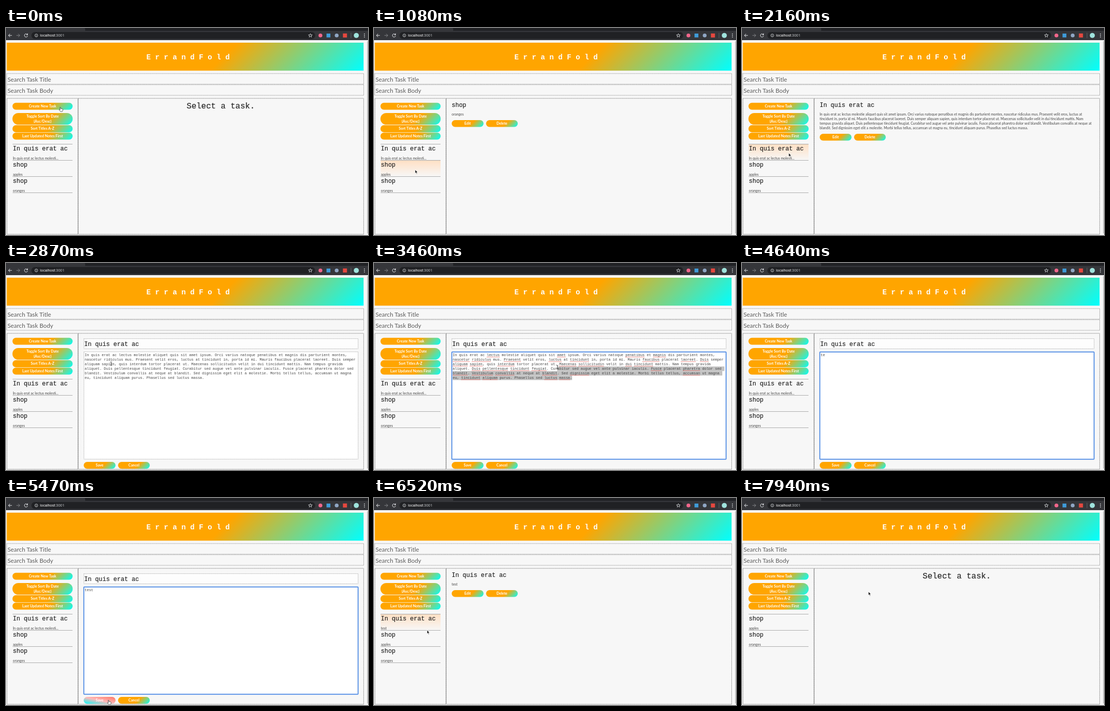
Animation of 713 by 409 pixels, one loop 8 s. Source, as an HTML page:

```html
<!DOCTYPE html>
<html lang="en">
<head>
<meta charset="utf-8">
<title>Task list</title>
<style>
html, body { margin: 0; width: 100%; height: 100%; overflow: hidden; background: #f7f7f7; }
svg { display: block; width: 713px; height: 409px; }
text, p { font-family: Lato, sans-serif; font-size: 6.85px; fill: #444; color: #444; }
p { margin: 0; line-height: 9px; }
.mono { font-family: "Liberation Mono", monospace; white-space: pre; }
.title { font-size: 12px; fill: #1c1c1c; stroke: #1c1c1c; stroke-width: .15px; }
.code { font-size: 7px; fill: #444; }
.big { font-size: 16px; fill: #2a2a2a; stroke: #2a2a2a; stroke-width: .2px; text-anchor: middle; }
.brand { font-size: 14.4px; font-weight: 700; fill: #fff; text-anchor: middle; }
.btn { font-size: 7.25px; font-weight: 700; fill: #fff; text-anchor: middle; }
.search { font-size: 11.8px; fill: #5c5c5c; }
.url { font-family: Roboto, sans-serif; font-size: 7.3px; fill: #fff; }
</style>
</head>
<body>
<svg viewBox="0 0 713 409" xmlns="http://www.w3.org/2000/svg">
  <defs>
    <linearGradient id="hot" x1="0" y1="1" x2="1" y2="0">
      <stop offset="0" stop-color="cyan"/><stop offset=".5" stop-color="#ffb8b8"/><stop offset="1" stop-color="#ff7561"/>
    </linearGradient>
    <linearGradient id="row" x2="0" y2="1">
      <stop offset="0" stop-color="#ffe0c4"/><stop offset="1" stop-color="#f7f7f7"/>
    </linearGradient>
  </defs>
  <g id="page"></g>
  <g id="live"></g>
</svg>
<script>
const LOOP = 8000;
const LINES = [
  "In quis erat ac lectus molestie aliquet quis sit amet ipsum. Orci varius natoque penatibus et magnis dis parturient montes,",
  "nascetur ridiculus mus. Praesent velit eros, luctus at tincidunt in, porta id mi. Mauris faucibus placerat laoreet. Duis semper",
  "aliquam sapien, quis interdum tortor placerat ut. Maecenas sollicitudin velit in dui tincidunt mattis. Nam tempus gravida",
  "aliquet. Duis pellentesque tincidunt feugiat. Curabitur sed augue vel ante pulvinar iaculis. Fusce placerat pharetra dolor sed",
  "blandit. Vestibulum convallis at neque at blandit. Sed dignissim eget elit a molestie. Morbi tellus tellus, accumsan ut magna",
  "eu, tincidunt aliquam purus. Phasellus sed luctus massa."
];
const MISSPELT = /\b(lectus|amet|penatibus|magnis|nascetur|ridiculus|Praesent|luctus|tincidunt|faucibus|laoreet|Duis|aliquam|sapien|interdum|Maecenas|sollicitudin|dui|pellentesque|feugiat|Fusce|pharetra|blandit|Vestibulum|convallis|dignissim|accumsan|massa)\b/g;
const CHAR = 4.2, LEAD = 8.95, TX = 155, TY = 177.6;

// Moments when the screen refreshes: first, last, count
const BEATS = [
  [0, 120, 2], [260, 960, 7], [1080, 1080, 1], [1320, 1560, 3], [1800, 1800, 1],
  [2160, 2870, 7], [2980, 3690, 7], [3810, 4050, 3], [4520, 5230, 7],
  [5350, 6050, 7], [6170, 6640, 5], [6880, 7470, 6], [7830, 7940, 2]
].flatMap(([a, b, n]) => Array.from({ length: n }, (_, i) =>
  Math.floor((a + (n > 1 ? (b - a) * i / (n - 1) : 0)) / 10) * 10));

// Pointer path: time, x, y
const PATH = [
  [0, 106, 156], [120, 106, 156], [260, 104, 163], [490, 98, 200], [720, 88, 272],
  [840, 84, 300], [960, 83, 299], [1080, 81, 280], [1320, 81, 278], [1560, 80, 249],
  [2160, 92, 247], [2510, 182, 213], [2630, 184, 213], [2870, 207, 199],
  [3100, 392, 227], [3690, 340, 191], [3810, 250, 188], [4050, 133, 171],
  [4870, 133, 171], [5110, 172, 330], [5230, 197, 391], [5460, 201, 399],
  [5700, 201, 397], [6050, 174, 274], [6280, 122, 252], [6520, 104.5, 261],
  [6640, 103, 267], [6880, 114, 262], [7230, 246, 188], [7940, 249, 185]
];

const rect = (x, y, w, h, fill, more = "") =>
  `<rect x="${x}" y="${y}" width="${w}" height="${h}" fill="${fill}" ${more}/>`;
const text = (x, y, s, cls = "") => `<text x="${x}" y="${y}" class="${cls}">${s}</text>`;
const circle = (x, y, r, fill, more = "") => `<circle cx="${x}" cy="${y}" r="${r}" fill="${fill}" ${more}/>`;
const path = (d, stroke, w = 1) => `<path d="${d}" fill="none" stroke="${stroke}" stroke-width="${w}"/>`;
const dotted = (x, y, w, h, color, fill = "none") =>
  rect(x, y, w, h, fill, `stroke="${color}" stroke-dasharray="1.3 1.1"`);

let gradients = 0;
// Diagonal orange to cyan fill at 45 degrees
function glow(x, y, w, h, r = 0) {
  const id = "g" + gradients++, k = (w + h) / 4, cx = x + w / 2, cy = y + h / 2;
  return `<linearGradient id="${id}" gradientUnits="userSpaceOnUse" x1="${cx - k}" y1="${cy - k}" x2="${cx + k}" y2="${cy + k}">
    <stop offset=".6" stop-color="orange"/><stop offset="1" stop-color="cyan"/></linearGradient>` +
    rect(x, y, w, h, `url(#${id})`, `rx="${r}"`);
}

const inside = (p, b) => p && p.x >= b.x && p.x <= b.x + b.w && p.y >= b.y && p.y <= b.y + b.h;

function button(b, hot) {
  const r = b.h / 2, rows = b.label.split("|");
  const y = b.y + r + 2.4 - (rows.length - 1) * 4.6;
  return (hot ? rect(b.x, b.y, b.w, b.h, "url(#hot)", `rx="${r}"`) : glow(b.x, b.y, b.w, b.h, r)) +
    rows.map((s, i) => text(b.x + b.w / 2, y + i * 9.2, s, "btn")).join("");
}

const side = (y, h, label) => ({ x: 12.7, y, w: 118.6, h, label });
const SIDE = [
  side(147.8, 13.6, "Create New Task"), side(168, 23, "Toggle Sort By Date|(Asc/Desc)"),
  side(192, 14, "Sort Titles A-Z"), side(206.8, 13.6, "Last Updated Notes First")
];
const pair = (y, a, b) => [
  { x: 153, y, w: 62.8, h: 13.6, label: a }, { x: 220.7, y, w: 62.5, h: 13.6, label: b }
];

function chrome() {
  const w = "#e8eaed";
  return rect(0, 0, 713, 7, "#202124") + rect(0, 0, 156, 7, "#35363a", 'rx="2"') +
    rect(0, 5.5, 713, 18.5, "#35363a") + rect(50, 8, 559, 13.5, "#202124", 'rx="6.7"') +
    path("M11.5 14.7H5M8 11.5L4.8 14.7L8 17.9", w) +
    path("M20.5 14.7H27M24 11.5L27.2 14.7L24 17.9", "#85878a") +
    path("M42 12.8A3.2 3.2 0 1 0 42.6 15.4M42.5 10.8V13.4H39.8", w) +
    circle(59.7, 14.7, 2.9, "none", `stroke="${w}" stroke-width=".8"`) + path("M59.7 14.2V16.4M59.7 12.9V13.6", w, .8) +
    text(67, 17.1, 'localhost<tspan fill="#c4c7ca">:3001</tspan>', "url") +
    path("M599.5 11L600.5 13.6L603.3 13.7L601.1 15.4L601.9 18.1L599.5 16.5L597.1 18.1L597.9 15.4L595.7 13.7L598.5 13.6Z", w, .8) +
    circle(619.3, 14.8, 3.8, "#f2668b") + rect(631.3, 11, 7.6, 7.6, "#3f9bd8") +
    circle(651.3, 14.8, 3.8, "#8fa6c4") + rect(663.6, 10.8, 8, 8, "#e5483f") +
    rect(679, 9.5, 1, 10.5, "#5c5e62") + circle(690, 14.8, 5, "#9fe3dc") +
    [11.6, 14.7, 17.8].map(y => circle(706, y, .85, w)).join("");
}

function backdrop() {
  return rect(0, 0, 713, 409, "#f7f7f7") + chrome() + rect(711.3, 26, 1.7, 380, "#c3c3c3") +
    glow(1.5, 29, 702.8, 55.3) + text(358.5, 62, "E r r a n d F o l d", "mono brand") +
    dotted(1.5, 90, 703, 21, "#888") + dotted(1.5, 112, 703, 21, "#888") +
    text(3, 105.5, "Search Task Title", "search") + text(3, 127.5, "Search Task Body", "search") +
    dotted(2, 139, 139.6, 268.5, "#666") + dotted(142.4, 139, 562, 268.5, "#666");
}

function pointerAt(t) {
  if (t >= 4520 && t <= 4870) return null;   // hidden while typing
  const i = Math.max(1, PATH.findIndex(k => k[0] >= t));
  const [a, b] = [PATH[i - 1], PATH[i]];
  const f = (t - a[0]) / (b[0] - a[0]);
  return { x: a[1] + (b[1] - a[1]) * f, y: a[2] + (b[2] - a[2]) * f };
}

function pointer(p, kind) {
  const at = s => `<g transform="translate(${p.x} ${p.y})">${s}</g>`;
  if (kind === "beam") return at(path("M-1.8 -3.7Q0 -3.7 0 -2.4Q0 -3.7 1.8 -3.7M0 -2.6V2.6M-1.8 3.7Q0 3.7 0 2.4Q0 3.7 1.8 3.7", "#333", .8));
  const hand = kind === "hand";
  const d = hand
    ? "M0 .8Q.9 -.1 1.5 .9L2.1 3.4Q3.2 2.9 3.6 3.6Q4.6 3.2 4.9 4.1Q6 4 6 5.2Q6.1 7.3 4.9 9H1.2Q.2 7.3 -1.6 5.7Q-1.3 4.7 .7 5.4Z"
    : "M0 0V7.2L1.7 5.7L2.9 8.4L4.1 7.9L2.9 5.3H5.1Z";
  return at(`<path d="${d}" fill="${hand ? "#fff" : "#111"}" stroke="${hand ? "#222" : "#fff"}" stroke-width=".7"/>`);
}

function selection(p) {
  const row = Math.floor((p.y - TY) / LEAD);
  const col = Math.max(0, Math.floor((p.x - TX) / CHAR));
  return LINES.map((s, i) => {
    if (i < row) return "";
    const from = i === row ? Math.min(col, s.length) : 0;
    const end = s.length * CHAR + (i < LINES.length - 1 ? 6 : 0);
    return rect(TX + from * CHAR, TY + i * LEAD, Math.min(end, 538) - from * CHAR, LEAD, "#c2c2c2");
  }).join("");
}

const squiggles = () => LINES.map((s, i) => [...s.matchAll(MISSPELT)].map(m => {
  const y = TY + i * LEAD + 8.3;
  return `<path d="M${TX + m.index * CHAR} ${y}h${m[0].length * CHAR}" stroke="#e0443c" stroke-dasharray="1.2 .8"/>`;
}).join("")).join("");

function editor(t, p) {
  let s = dotted(153.5, 149.5, 540, 20, "#aaa", "#fdfdfd") + text(154, 164, "In quis erat ac", "mono title");
  s += t >= 2980
    ? rect(153.3, 175.8, 540.2, 212, "#fff", 'rx="1" stroke="#5b93e6" stroke-width="2"')
    : dotted(153.5, 175.5, 540, 212, "#aaa", "#fff");
  if (t >= 4520) {
    const n = Math.min(4, 1 + Math.floor((t - 4510) / 115));
    return s + text(TX, TY + 6.6, "test".slice(0, n), "mono code");
  }
  if (t >= 3200) s += selection(p);
  s += LINES.map((l, i) => text(TX, TY + 6.6 + i * LEAD, l, "mono code")).join("");
  return s + (t >= 2980 ? squiggles() : "");
}

function detail(title, body, long) {
  return text(153, 156, title, "mono title") + (long
    ? `<foreignObject x="153" y="166" width="541" height="40"><p>${body}</p></foreignObject>`
    : text(153, 173.2, body));
}

function scene(t) {
  const p = pointerAt(t), editing = t >= 2630 && t < 5580;
  const saved = t >= 5580, gone = t >= 7830, blank = t < 840 || gone;
  let main, btns = [];
  if (blank) main = text(423, 159.2, "Select a task.", "mono big");
  else if (editing) {
    main = editor(t, p);
    btns = pair(393, "Save", "Cancel");
  } else {
    const long = t >= 1800 && !saved;
    main = long ? detail("In quis erat ac", LINES.join(" "), true)
      : saved ? detail("In quis erat ac", "test") : detail("shop", t < 1440 ? "oranges" : "apples");
    btns = pair(long ? 209 : 182, "Edit", "Delete");
  }

  const tasks = [["shop", "apples"], ["shop", "oranges"]];
  if (!gone) tasks.unshift(["In quis erat ac", saved ? "test" : "In quis erat ac lectus molesti..."]);
  const rule = y => rect(13, y, 118, .9, "#a4a4a4");
  const list = rule(229.1) + tasks.map(([a, b], i) => {
    const y = 229.1 + 32 * i, hot = inside(p, { x: 13, y: y + .5, w: 118, h: 32 });
    return (hot ? rect(13, y + .5, 118, 32, "url(#row)") + rule(y) : "") +
      text(13.5, y + 12.7, a, "mono title") + text(13.5, y + 30.5, b) + rule(y + 32);
  }).join("");

  const all = [...SIDE, ...btns], over = all.find(b => inside(p, b));
  const beam = editing && inside(p, { x: 153, y: 175, w: 541, h: 213 });
  const kind = beam ? "beam" : over ? "hand" : "arrow";
  return list + main + all.map(b => button(b, b === over && t > 0)).join("") + (p ? pointer(p, kind) : "");
}

const live = document.getElementById("live");
document.getElementById("page").innerHTML = backdrop();
const fixed = gradients;
let shown = -1;

function draw(now) {
  const t = now % LOOP, beat = BEATS.findLast(b => b <= t);
  if (beat !== shown) {
    gradients = fixed;
    live.innerHTML = scene(beat);
    shown = beat;
  }
}

const start = performance.now();
function tick() {
  draw(performance.now() - start);
  requestAnimationFrame(tick);
}
tick();
</script>
</body>
</html>
```
